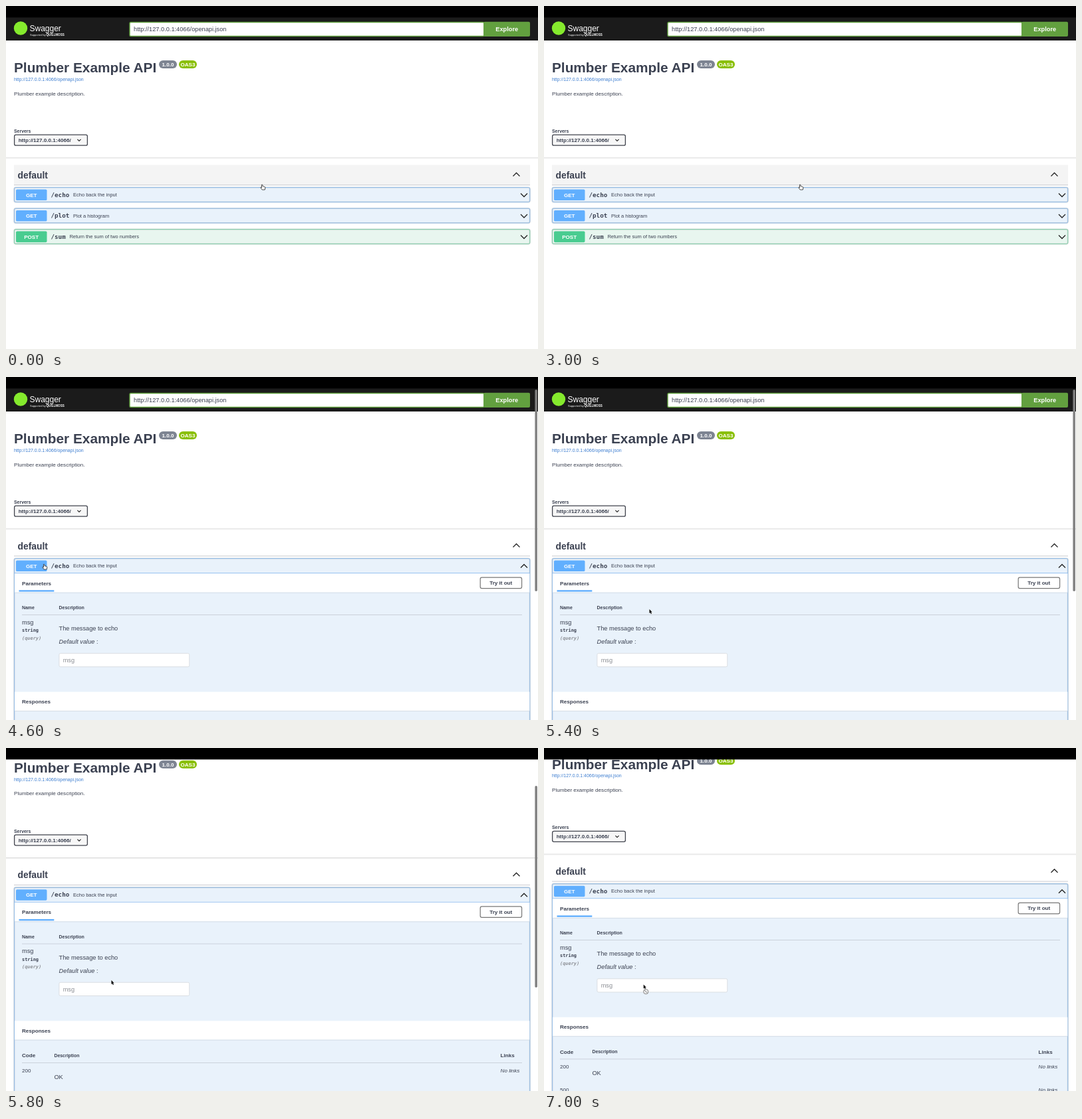
An HTML page for the animation above (8000 ms loop, 800x517 px).

```html
<!DOCTYPE html>
<html lang="en">
<head>
<meta charset="utf-8">
<title>API explorer</title>
<style>
html, body { margin: 0; width: 100%; height: 100%; overflow: hidden; background: #fff; }
svg { display: block; width: 800px; height: 517px; }
text { font-family: "Liberation Sans", Arial, sans-serif; white-space: pre; fill: #3b4151; }
.b { font-weight: 700; }
.i { font-style: italic; }
.c { text-anchor: middle; }
.w { fill: #fff; }
.g { fill: #8b8e94; }
.m { font-family: "DejaVu Sans Mono", monospace; font-weight: 700; }
</style>
</head>
<body>
<svg id="stage" viewBox="0 0 800 517"></svg>
<script>
const BLUE = '#61affe', GREEN = '#49cc90', LEAF = '#62a03f';
// type sizes of the page at its display scale
const XS = 6.93, S = 8.08, M = 9.23, L = 13.85, XL = 20.8;

const text = (x, y, str, size, cls = '') =>
  `<text x="${x}" y="${y}" font-size="${size}" class="${cls}">${str}</text>`;
const rect = (x, y, w, h, fill, r = 0, stroke = 'none', sw = 1) =>
  `<rect x="${x}" y="${y}" width="${w}" height="${h}" rx="${r}" fill="${fill}" stroke="${stroke}" stroke-width="${sw}"/>`;
const chevron = (x, y, dy, r = 5, sw = 1.3) =>
  `<path d="M${x - r} ${y - dy / 2}l${r} ${dy}l${r} ${-dy}" fill="none" stroke="#222" stroke-width="${sw}"/>`;
const rule = y => rect(24, y, 752, .8, '#c3cad3');
const group = (id, body) => `<g id="${id}">${body}</g>`;

const box = (y, h, color, fill) =>
  rect(12.4, y, 775.4, h, fill, 2.3, 'rgba(0,0,0,.13)', 2.2) +
  rect(12.4, y, 775.4, h, 'none', 2.3, color, .8);

const summary = (y, verb, path, note, color) =>
  rect(15, y + 3, 46.5, 16.6, color, 1.7) +
  text(38.2, y + 14.2, verb, S, 'b c w') +
  text(67.5, y + 14.3, path, M, 'm') +
  text(67.5 + path.length * 5.557 + 5.7, y + 13.7, note, 7.5);

const band = (y, h, title) =>
  rect(13, y, 774.3, h, '#fff') + rect(13, y + h, 774.3, 1, '#d5dde6') +
  text(24, y + 17.5, title, S, 'b');

const topbar =
  rect(0, 17, 800, 35, '#1b1b1b') +
  '<circle cx="22" cy="33.5" r="10.2" fill="#85ea2d"/>' +
  text(35.5, 38, 'Swagger', 12, 'w') +
  text(36, 45.3, 'Supported by', 4, 'w') + text(60.5, 45.3, 'QUILLMOSS', 4.6, 'b w') +
  rect(186, 24.5, 533, 21, '#fff', 1.8, LEAF, 1.4) +
  rect(718, 23.8, 70, 22.3, LEAF, 2) +
  text(192, 38, 'http://127.0.0.1:4066/openapi.json', M) +
  text(753.2, 38, 'Explore', M, 'b c w');

const info =
  text(12, 100.4, 'Plumber Example API', XL, 'b') +
  rect(230, 82, 27, 12, '#7d8492', 6) + text(243.5, 91, '1.0.0', S, 'b c w') +
  rect(260, 82, 27, 12, '#89bf04', 6) + text(273.5, 91, 'OAS3', S, 'b c w') +
  `<g style="--c:#4990e2">${text(12, 113.3, 'http://127.0.0.1:4066/openapi.json', XS).replace('<text', '<text style="fill:#3f7fd0"')}</g>` +
  text(12, 134.7, 'Plumber example description.', S) +
  text(12, 191, 'Servers', XS, 'b') +
  rect(12.6, 194.2, 109.8, 16, '#f7f7f7', 2.3, '#41444e', 1.3) +
  text(18.7, 205, 'http://127.0.0.1:4066/', S, 'b') + chevron(110, 202.2, 2.6, 2.6, 1.1) +
  rect(0, 228.4, 800, 1, '#d8d8d8') + rect(0, 229.4, 800, .8, '#f0f0f0');

const tag =
  group('hover', rect(12, 239.5, 776, 30.3, '#f4f4f4')) +
  rect(12, 269.4, 776, .9, '#c4c6cb') +
  text(17.5, 259.8, 'default', L, 'b') + chevron(767.5, 254, -5);

const echo = ['GET', '/echo', 'Echo back the input', BLUE];
const closed =
  box(273.5, 22, '#7fb5ec', '#e9f2fb') + summary(273.5, ...echo) + chevron(779, 285, 5) +
  box(305, 22, '#7fb5ec', '#e9f2fb') + summary(305, 'GET', '/plot', 'Plot a histogram', BLUE) + chevron(779, 316.5, 5) +
  box(336.6, 22, '#6fd0a3', '#e8f6ef') + summary(336.6, 'POST', '/sum', 'Return the sum of two numbers', GREEN) + chevron(779, 348, 5);

const open =
  box(273.5, 400, '#7fb5ec', '#e9f2fb') + summary(273.5, ...echo) + chevron(779, 285, -5) +
  rect(12.4, 295.2, 775.4, .9, '#86b9ee') +
  band(296.1, 28.6, 'Parameters') + rect(19.5, 321.2, 52.8, 2.4, BLUE) +
  rect(713.2, 302.2, 62.4, 16.4, '#fff', 2.3, '#777', 1.2) + text(744.2, 313.2, 'Try it out', S, 'b c') +
  text(24, 350, 'Name', XS, 'b') + text(79.6, 350, 'Description', XS, 'b') + rule(358) +
  text(24, 372.7, 'msg', M) + text(24, 384.3, 'string', XS, 'm') + text(24, 395.5, '(query)', XS, 'm i g') +
  text(79.6, 382.2, 'The message to echo', M) +
  text(79.6, 402, 'Default value', M, 'i') + text(136, 402, ':', M) +
  rect(79.9, 416.6, 195.8, 20.2, '#fff', 2, '#d5d8dc', .8) + text(85.7, 429.9, 'msg', M, 'g') +
  band(474.6, 28.4, 'Responses') +
  text(24, 529.4, 'Code', S, 'b') + text(72.4, 529, 'Description', XS, 'b') + text(743.6, 529.4, 'Links', S, 'b') + rule(537.3) +
  text(24, 552, '200', S) + text(743.6, 552, 'No links', S, 'i') + text(72.4, 562.2, 'OK', M) +
  text(24, 586.7, '500', S) + text(743.6, 586.7, 'No links', S, 'i');

const hand = '<path d="M-1.6 -3.6q.9 -.7 1.4 .3l.3 2l3 .8q.9 .4 .7 1.5l-.6 3h-4l-2.3 -3.1q-.2 -1 .8 -.8l.9 .7z" fill="#fff" stroke="#222" stroke-width=".8"/>';
const arrow = '<path d="M0 -1.5v6.2l1.4 -1.2l1 2.2l1 -.5l-1 -2.1h1.7z" fill="#000" stroke="#fff" stroke-width=".5" paint-order="stroke"/>';
const denied = '<g transform="translate(3.5 9.2)" fill="#e8e8e8" stroke="#8d8d8d"><circle r="3.7"/><path d="M-2.6 -2.6l5.2 5.2"/></g>';

const stage = document.getElementById('stage');
stage.innerHTML =
  group('page', topbar + info + tag + group('closed', closed) + group('open', open)) +
  group('bar', rect(795.4, 0, 3.5, 304, '#808080', 1.7)) +
  rect(0, 0, 800, 17.3, '#000') +
  group('cursor', group('hand', hand) + group('arrow', arrow) + group('denied', denied));

const el = id => document.getElementById(id);
const show = (id, on) => el(id).setAttribute('display', on ? 'inline' : 'none');
const move = (id, x, y) => el(id).setAttribute('transform', `translate(${x} ${y})`);

// time, cursor x, cursor y, scroll
const keys = [
  [0, 386, 273, 0], [3000, 386, 273, 0], [4000, 59, 286, 0], [4200, 58, 286, 0],
  [4600, 58, 286, 0], [5400, 158.5, 351.5, 0], [5600, 158.5, 351.5, 34.5],
  [5800, 158.5, 351.5, 63.3], [6000, 153, 355.5, 67.5], [6200, 149.7, 358, 68.8], [8000, 149.7, 358, 68.8]
];

function pose(t) {
  const n = keys.findIndex(k => k[0] > t);
  const a = keys[n - 1], b = keys[n];
  const u = (t - a[0]) / (b[0] - a[0]);
  const e = u * u * (3 - 2 * u);
  return a.slice(1).map((v, i) => v + (b[i + 1] - v) * e);
}

function draw(now) {
  const t = Math.floor(now % 8000 / 200) * 200;
  const [x, y, scroll] = pose(t);
  const opened = t >= 4600, onHeader = y < 296;
  show('hover', t < 3400);
  show('closed', !opened);
  show('open', opened);
  show('hand', onHeader);
  show('arrow', !onHeader);
  show('denied', opened && y > 416.6 - scroll);
  move('page', 0, -scroll);
  move('cursor', x, y);
  move('bar', 0, 19 + scroll * .6);
  el('bar').setAttribute('opacity', opened ? Math.max(0, Math.min(1, (7000 - t) / 600)) : 0);
  requestAnimationFrame(() => draw(performance.now()));
}
draw(performance.now());
</script>
</body>
</html>
```
